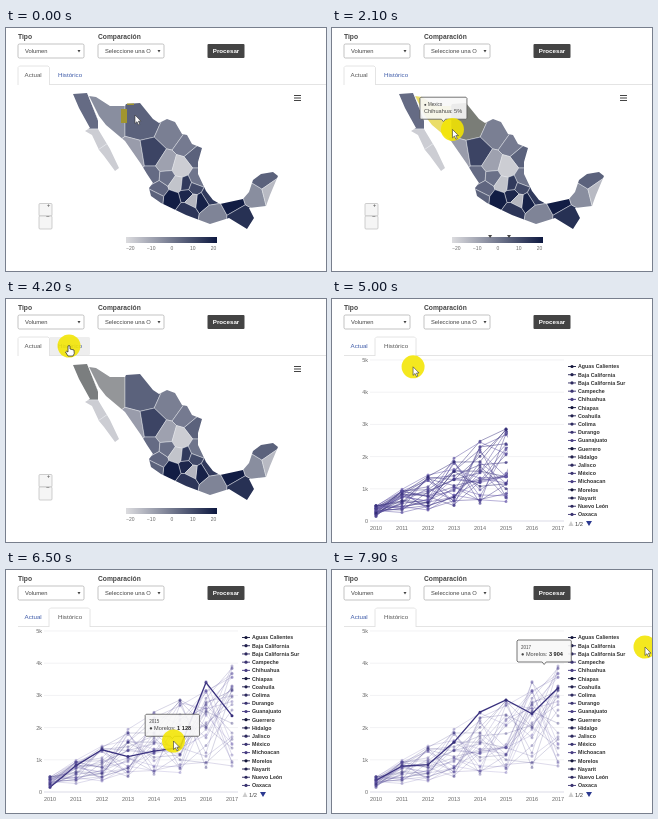
An HTML page for the animation above (8000 ms loop, 320x243 px).

```html
<!DOCTYPE html>
<html lang="es">
<head>
<meta charset="utf-8">
<style>
html, body { margin: 0; width: 100%; height: 100%; overflow: hidden; background: #fff; }
svg { display: block; width: 320px; height: 243px; font-family: "Liberation Sans", Arial, sans-serif; font-size: 6.2px; fill: #444; }
.b { font-weight: bold; }
.tick { font-size: 5.5px; fill: #666; }
.legend { font-size: 5.3px; font-weight: bold; fill: #333; }
</style>
</head>
<body>
<svg id="stage" viewBox="0 0 320 243">
  <defs>
    <clipPath id="land"><path id="coast" d="M67 66 81 65 92 92 92 101 104 121 113 140 109 143 98 128 93 122 86 107 79 103 84 100 73 80Z
      M83 68 90 69 104 78 119 78 120 76 134 75 147 91 153 95 161 91 169 94 176 106 181 107 186 116 196 120 192 134 192 146 200 163 207 172 214 176 237 171 243 164 247 152 255 146 267 144 272 148 264 167 260 178 243 180 248 190 241 201 223 190 204 196 180 187 155 175 145 168 143 160 147 155 141 146 135 136 119 113 100 97 93 88Z"/></clipPath>
    <linearGradient id="ramp"><stop stop-color="#dcdcdf"/><stop offset="1" stop-color="#0d1840"/></linearGradient>
    <clipPath id="reveal"><rect id="wipe" x="36" y="50" height="180"/></clipPath>
    <clipPath id="field"><rect x="92" y="16" width="53" height="14"/></clipPath>
  </defs>

  <text class="b" x="12" y="11" font-size="6.7">Tipo</text>
  <text class="b" x="92" y="11" font-size="6.7">Comparación</text>
  <g fill="#fff" stroke="#aaa" stroke-width=".7">
    <rect x="12" y="16" width="66" height="14" rx="1.5"/>
    <rect x="92" y="16" width="66" height="14" rx="1.5"/>
  </g>
  <text x="19" y="25" font-size="5.8">Volumen</text>
  <text x="99" y="25" font-size="5.8" clip-path="url(#field)">Seleccione una Opción</text>
  <path d="M71.500 22h3l-1.500 2.500zM151.500 22h3l-1.500 2.500z"/>
  <rect x="201.500" y="16" width="37" height="14" rx="1" fill="#444"/>
  <text class="b" x="220" y="25.200" text-anchor="middle" fill="#fff">Procesar</text>

  <path d="M12 56.500H320" stroke="#ddd" stroke-width=".8"/>
  <rect id="hoverTab" x="43" y="38" width="41" height="18" rx="1.5" fill="#eee"/>
  <path id="tab" fill="#fff" stroke="#ddd" stroke-width=".8"/>
  <text id="now" x="18.500" y="49">Actual</text>
  <text id="past" x="52" y="49">Histórico</text>

  <g id="map">
    <path d="M288 67.500h7M288 70h7M288 72.500h7" stroke="#444" stroke-width="1.1"/>
    <g id="states" clip-path="url(#land)" stroke="#e6e8ee" stroke-width=".45" stroke-linejoin="round"></g>
    <path id="trace" d="M115 81h6v14h-6zM121 75.500h7v1.500h-7z" fill="#a1952f"/>
    <g fill="#f5f5f5" stroke="#bbb" stroke-width=".7">
      <rect x="33" y="175.500" width="13" height="12.500" rx="1"/>
      <rect x="33" y="188" width="13" height="13" rx="1"/>
    </g>
    <text x="42.500" y="178.500" text-anchor="middle">+</text>
    <text x="42" y="191" text-anchor="middle">−</text>
    <rect x="120" y="209" width="91" height="6" fill="url(#ramp)"/>
    <g id="scale" class="tick" text-anchor="middle"></g>
    <path class="mark" d="M-2 207h4l-2 3z"/>
    <path class="mark" d="M-2 207h4l-2 3z"/>
  </g>

  <g id="chart">
    <g id="axes" class="tick"></g>
    <g id="lines" clip-path="url(#reveal)"></g>
    <g id="legend" class="legend"></g>
    <path d="M236.500 227h5l-2.500-5z" fill="#ccc"/>
    <text x="243" y="227" font-size="5.8">1/2</text>
    <path d="M254 222h6l-3 5z" fill="#2b3990"/>
  </g>

  <g id="tip">
    <path id="box" fill="#f8f8f8" fill-opacity=".9" stroke="#555" stroke-width=".8"/>
    <text id="head" x="4" y="9.200" font-size="4.500"></text>
    <text id="body" x="4" y="16" font-size="5.600"></text>
  </g>
  <circle id="halo" r="11.500" fill="#f2e500" fill-opacity=".88"/>
  <path id="arrow" d="M0 0V8.500L2 6.700 3.400 9.800 4.800 9.200 3.400 6.200H6Z" fill="#fff" stroke="#333" stroke-width=".6"/>
  <path id="hand" d="M-1 0Q0-1 1 0V3L5 4Q6 8 4 10H-1L-3.500 6Q-3 4.500-1 6Z" fill="#fff" stroke="#222" stroke-width=".7"/>
</svg>
<script>
const $ = id => document.getElementById(id);
const LOOP = 8000, STEP = 50, SWITCH = 4400;

function add(parent, tag, attrs, text) {
  const e = document.createElementNS('http://www.w3.org/2000/svg', tag);
  for (const k in attrs) e.setAttribute(k, attrs[k]);
  if (text !== undefined) e.textContent = text;
  return $(parent).appendChild(e);
}
const set = (id, k, v) => $(id).setAttribute(k, v);
const show = (id, on) => { $(id).style.display = on ? '' : 'none'; };
const place = (id, x, y) => set(id, 'transform', `translate(${x} ${y})`);
const mix = (a, b, f) => a.map((v, i) => v + (b[i] - v) * f);
const rgb = c => `rgb(${c.map(Math.round)})`;

// Eased position on a list of [time, x, y]
function along(keys, t) {
  let i = 0;
  while (i < keys.length - 2 && t >= keys[i + 1][0]) i++;
  const [a, b] = [keys[i], keys[i + 1]];
  const f = Math.min(1, Math.max(0, (t - a[0]) / (b[0] - a[0])));
  return mix(a.slice(1), b.slice(1), f * f * (3 - 2 * f));
}

const mouse = [
  [0, 129, 87], [250, 88, 76], [600, 133, 94], [1150, 133, 94], [1450, 89, 76],
  [1900, 108, 97], [2650, 179, 122], [2900, 136, 111], [3000, 128, 110],
  [3500, 53, 47], [3900, 63, 47], [4700, 63, 47], [5800, 162, 161],
  [7200, 173, 181], [7900, 313, 77]
];

// ---- Map: each state is the Voronoi cell of its seed [name, value, x, y] ----
const seeds = [
  ['Baja California', 3, 87, 98], ['Baja California Sur', -17, 87, 104], ['Baja California Sur', -17, 107, 133],
  ['Sonora', -4, 100, 93], ['Chihuahua', 5, 138, 93], ['Coahuila', -1, 167, 106],
  ['Nuevo León', 0, 181, 116], ['Tamaulipas', 5, 191, 128], ['Sinaloa', -7, 128, 131],
  ['Durango', 11, 146, 128], ['Zacatecas', -8, 160, 137], ['San Luis Potosí', -17, 174, 141],
  ['Nayarit', 3, 146, 148], ['Jalisco', 4, 153, 161], ['Aguas Calientes', 2, 161, 149],
  ['Guanajuato', -15, 171, 156], ['Veracruz', 1, 191, 152], ['Veracruz', 13, 203, 168],
  ['Querétaro', 13, 180, 157], ['Hidalgo', 10, 188, 160], ['México', 17, 181, 167],
  ['Puebla', 18, 195, 173], ['Morelos', -12, 186, 172], ['Michoacan', 19, 166, 171],
  ['Colima', 5, 149, 169], ['Guerrero', 14, 181, 182], ['Oaxaca', -2, 206, 186],
  ['Tabasco', 19, 228, 174], ['Chiapas', 15, 236, 188], ['Campeche', -4, 247, 168],
  ['Yucatán', 5, 258, 150], ['Quintana Roo', -13, 267, 163]
];

// Cut the stage by the bisector to every other seed
function cell(s) {
  let poly = [[0, 60], [320, 60], [320, 220], [0, 220]];
  for (const o of seeds) {
    if (o === s) continue;
    const dx = o[2] - s[2], dy = o[3] - s[3];
    const mid = (o[2] + s[2]) / 2 * dx + (o[3] + s[3]) / 2 * dy;
    const side = p => p[0] * dx + p[1] * dy - mid;
    poly = poly.flatMap((p, i) => {
      const q = poly[(i + 1) % poly.length], a = side(p), b = side(q);
      const out = a <= 0 ? [p] : [];
      if (a * b < 0) out.push(mix(p, q, a / (a - b)));
      return out;
    });
  }
  return `M${poly.join(' ')}Z`;
}

const states = seeds.map(s => {
  const d = cell(s), [name, value] = s;
  const base = mix([220, 220, 223], [13, 24, 64], (value + 20) / 40);
  return { name, value, base, shape: new Path2D(d), el: add('states', 'path', { d }) };
});

for (let v = -20; v <= 20; v += 10)
  add('scale', 'text', { x: 166 + v * 2.08, y: 222, 'font-size': 5 }, String(v).replace('-', '−'));

// State under the mouse at each step
const land = new Path2D($('coast').getAttribute('d'));
const pen = document.createElement('canvas').getContext('2d');
const hovered = Array.from({ length: LOOP / STEP }, (_, i) => {
  const [x, y] = along(mouse, i * STEP);
  return pen.isPointInPath(land, x, y) ? states.find(s => pen.isPointInPath(s.shape, x, y)) : null;
});
function under(t) {
  for (let d = 0; d <= 300; d += STEP) {
    const s = hovered[(t - d) / STEP];
    if (s) return s;
  }
  return null;
}
function glow(s, t) {
  for (let d = 0; d < 900; d += STEP)
    if (hovered[(t - 150 - d) / STEP] === s) return 1 - d / 900;
  return 0;
}

// ---- Chart ----
const px = k => 44 + k * 26, py = v => 222 - v * 0.0322;
for (let k = 0; k <= 5; k++) {
  add('axes', 'path', { d: `M38 ${py(k * 1000)}H232`, stroke: k ? '#ececf0' : '#ccd', 'stroke-width': .7 });
  add('axes', 'text', { x: 36, y: py(k * 1000) + 2, 'text-anchor': 'end' }, k ? k + 'k' : '0');
}
for (let k = 0; k < 8; k++)
  add('axes', 'text', { x: px(k), y: 231, 'text-anchor': 'middle' }, 2010 + k);

let seed = 7;
const rand = () => (seed = seed * 16807 % 2147483647) / 2147483647;
const main = [
  [250, 930, 760, 480, 2300, 2400, 2000, 3290],
  [150, 820, 1310, 1100, 1270, 1380, 3400, 2370],
  [360, 800, 850, 1550, 2480, 2860, 2430, 3230]
];
const drawn = Array.from({ length: 30 }, (_, i) => {
  const tone = rgb(mix([42, 36, 110], [112, 98, 180], i < main.length ? .2 : rand()));
  const pts = Array.from({ length: 8 }, (_, k) =>
    [px(k), py(main[i] ? main[i][k] : 150 + 90 * k + (350 + 400 * k) * rand())]);
  return {
    line: add('lines', 'polyline', { points: pts.join(' '), fill: 'none', stroke: tone }),
    dots: add('lines', 'path', {
      d: pts.map(p => `M${p}h0`).join(''), stroke: tone, 'stroke-width': 3, 'stroke-linecap': 'round'
    })
  };
});

('Aguas Calientes,Baja California,Baja California Sur,Campeche,Chihuahua,Chiapas,Coahuila,Colima,' +
 'Durango,Guanajuato,Guerrero,Hidalgo,Jalisco,México,Michoacan,Morelos,Nayarit,Nuevo León,Oaxaca')
  .split(',').forEach((name, i) => {
    const y = 67.5 + i * 8.22, c = rgb(mix([20, 22, 60], [70, 60, 130], i % 5 / 4));
    add('legend', 'path', { d: `M236 ${y}h8`, stroke: c, 'stroke-width': .9 });
    add('legend', 'circle', { cx: 240, cy: y, r: 1.6, fill: c });
    add('legend', 'text', { x: 246, y: y + 1.9 }, name);
  });

// Hovered points; each tooltip slides to x, y
const notes = [
  { from: 5500, x: 134, y: 130, year: 2015, text: 'Puebla: ', value: '1 890', lit: 0 },
  { from: 6350, x: 142, y: 152, year: 2015, text: 'Morelos: ', value: '1 128', lit: 1 },
  { from: 7350, x: 185, y: 70, year: 2017, text: 'Morelos: ', value: '3 904', lit: 2 }
];

function tooltip(x, y, w, head, body, bold) {
  place('tip', x, y);
  set('box', 'd', `M1 0H${w - 1}L${w} 1V21L${w - 1} 22H${w / 2 + 2}l-2 2.500-2-2.500H1L0 21V1Z`);
  $('head').textContent = head;
  $('body').textContent = body;
  if (bold) add('body', 'tspan', { class: 'b', fill: '#222' }, bold);
}

function drawMap(t) {
  for (const s of states)
    s.el.setAttribute('fill', rgb(mix(s.base, [234, 221, 104], glow(s, t))));
  show('trace', t < 100);
  const s = t >= 100 && under(t);
  show('tip', s);
  document.querySelectorAll('.mark').forEach((m, i) => {
    const r = t >= 100 && under(t - i * 150);
    m.setAttribute('transform', `translate(${166.5 + (r ? r.value : 0) * 2.1})`);
    m.style.display = r ? '' : 'none';
  });
  if (!s) return;
  const [x, y] = along(mouse, t - 100);
  tooltip(x - 23.5, y - 29, Math.max(47, 20 + s.name.length * 3), '● Mexico', `${s.name}: ${s.value}%`);
}

function drawChart(t) {
  set('wipe', 'width', Math.min(1, (t - SWITCH + 100) / 1000) * 200);
  const n = notes.filter(n => t >= n.from).length - 1, note = notes[n];
  drawn.forEach((d, i) => {
    const lit = note && note.lit === i;
    d.line.setAttribute('opacity', lit ? 1 : note ? .25 : .6);
    d.line.setAttribute('stroke-width', lit ? 1.3 : .8);
    d.dots.setAttribute('opacity', lit ? 1 : note ? .36 : .7);
  });
  show('tip', note);
  if (!note) return;
  const last = notes[n - 1] || note;
  const [x, y] = along([[note.from, last.x, last.y], [note.from + 250, note.x, note.y]], t);
  tooltip(x, y, 30 + note.text.length * 2.7, note.year, '● ' + note.text, note.value);
}

function frame() {
  const t = Math.floor(performance.now() % LOOP / 100) * 100;
  const past = t >= SWITCH, onTab = t >= 3500 && t <= 4700;
  show('map', !past);
  show('chart', past);
  show('hoverTab', onTab && !past);
  set('tab', 'd', past ? 'M43 57V39.500L44.500 38H82.500L84 39.500V57' : 'M12 57V39.500L13.500 38H42L43.500 39.500V57');
  set('now', 'fill', past ? '#3d5aa8' : '#555');
  set('past', 'fill', past ? '#555' : '#3d5aa8');
  (past ? drawChart : drawMap)(t);
  const [x, y] = along(mouse, t);
  for (const id of ['halo', 'arrow', 'hand']) place(id, x, y);
  show('halo', t >= 100);
  show('hand', onTab);
  show('arrow', !onTab);
  requestAnimationFrame(frame);
}
frame();
</script>
</body>
</html>
```
